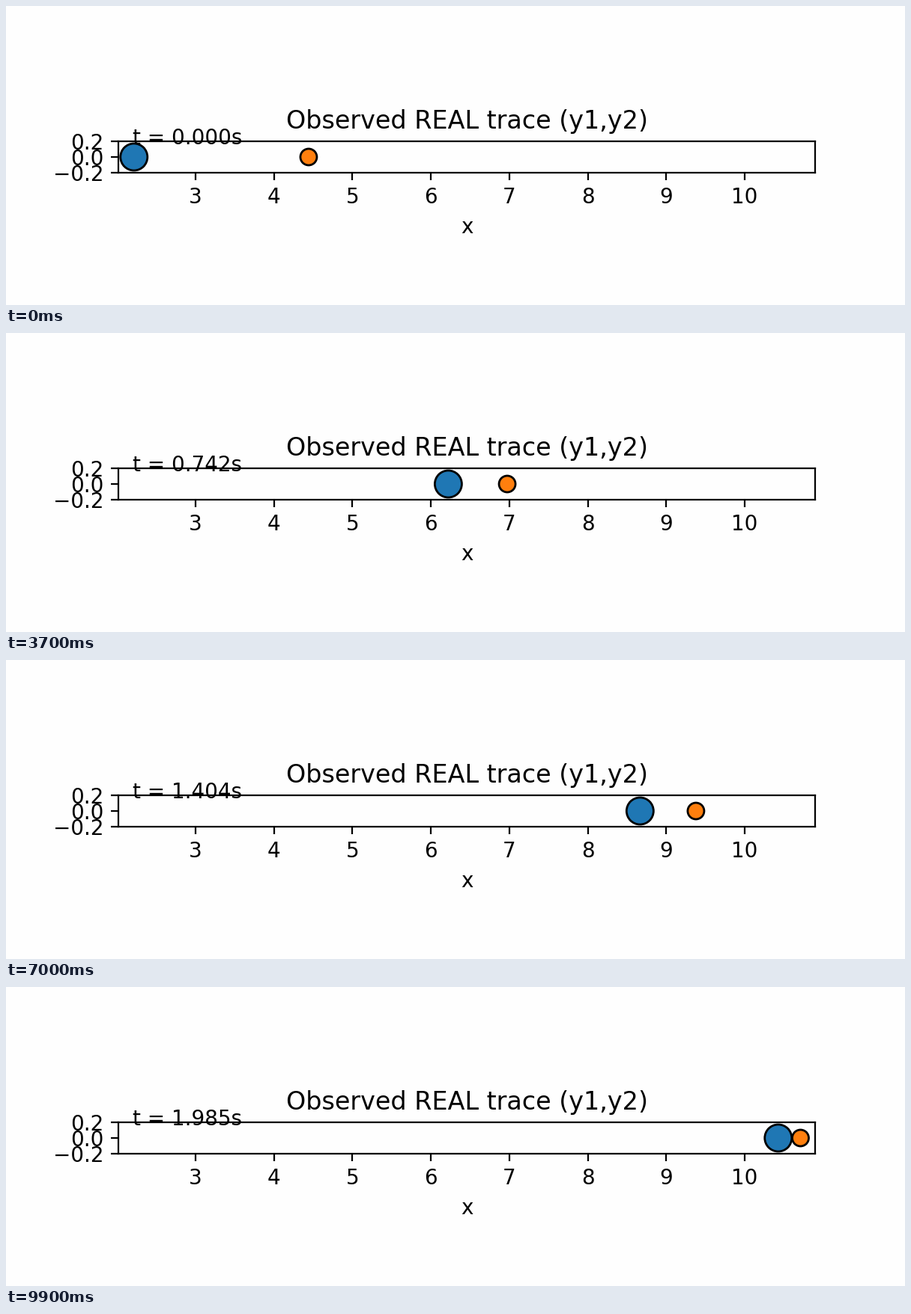
A matplotlib script that plays this animation: 1200x400 px, repeating every 10 s.

```python
import numpy as np
import matplotlib.pyplot as plt
from matplotlib.animation import FuncAnimation
from matplotlib.patches import Circle

FRAMES = 100
STEP = 4 * 2.0 / 399          # every fourth of 400 samples over two seconds
HIT = 13.9                    # frame at which the discs collide
PAPER = "#fefefe"

plt.rcParams["font.family"] = "DejaVu Sans"


def glide(frame, start, pos, speed, drag):
    """Position under linear drag, given position and speed at frame `start`."""
    return pos + speed * (1 - np.exp(-drag * (frame - start))) / drag


# The big disc strikes the resting small one, then both coast.
frames = np.arange(FRAMES)
big = np.where(frames < HIT,
               glide(frames, 0, 2.2186, 0.1469, 0.0065),
               glide(frames, 24, 5.1064, 0.0896, 0.0065))
small = np.where(frames < HIT, 4.443, glide(frames, 24, 5.653, 0.1113, 0.0147))
trace = np.column_stack([big, small])
trace += np.random.default_rng(4).normal(0, 0.003, trace.shape)  # sensor noise

fig, ax = plt.subplots(figsize=(6, 2), dpi=200, facecolor=PAPER)
fig.subplots_adjust(left=0.125, right=0.9, bottom=0.11, top=0.88)
ax.set_facecolor(PAPER)
ax.set_xlim(2.01814, 10.89643)
ax.set_ylim(-0.2, 0.2)
ax.set_aspect("equal")
ax.set_xticks(range(3, 11))
ax.set_yticks([-0.2, 0.0, 0.2])
ax.set_xlabel("x")
ax.set_title("Observed REAL trace (y1,y2)")

discs = [ax.add_patch(Circle((0, 0), radius, facecolor=color,
                             edgecolor="black", linewidth=1))
         for radius, color in ((0.172, "C0"), (0.105, "C1"))]
clock = ax.text(0.02, 0.9, "", transform=ax.transAxes)


def update(frame):
    for disc, x in zip(discs, trace[frame]):
        disc.center = (x, 0)
    clock.set_text(f"t = {frame * STEP:.3f}s")
    return [*discs, clock]


anim = FuncAnimation(fig, update, frames=FRAMES, interval=100, repeat=True)
plt.show()
```
